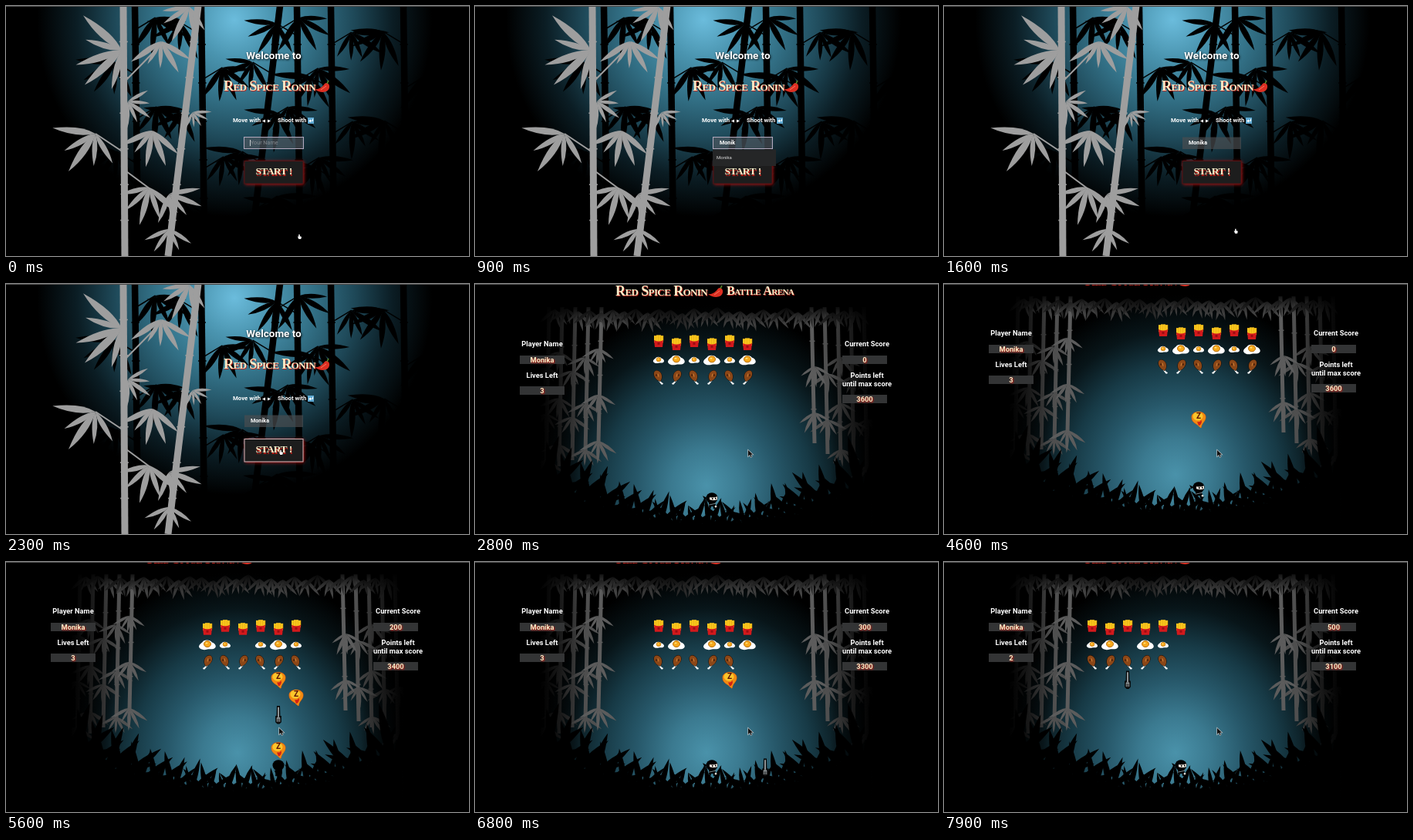
An HTML page with a canvas for the animation above (8 s loop, 600 by 325 pixels).

```html
<!DOCTYPE html>
<html lang="en">
<head>
<meta charset="utf-8">
<title>Red Spice Ronin</title>
<style>
html, body { margin: 0; width: 100%; height: 100%; overflow: hidden; background: #000; }
canvas { display: block; }
</style>
</head>
<body>
<canvas id="stage" width="600" height="325"></canvas>
<script>
const W = 600, H = 325, LOOP = 8000, GAME_START = 2700;
const PLAYER = 'Monika', TITLE = 'Red Spice Ronin';
const SANS = 'Roboto, Arial, sans-serif', SERIF = '"Liberation Serif", serif';
const CREAM = '#f7edc8', RED = '#c4241c';
const stage = document.getElementById('stage').getContext('2d');
let g = stage, seed = 7;

const random = () => (seed = seed * 16807 % 2147483647) / 2147483647;
const clamp = v => Math.max(0, Math.min(1, v));
const ease = v => (v = clamp(v)) * v * (3 - 2 * v);

// ---------- drawing helpers ----------
function layer(draw) {
  const c = document.createElement('canvas');
  c.width = W; c.height = H;
  g = c.getContext('2d');
  draw();
  g = stage;
  return c;
}
function rect(x, y, w, h, fill) { g.fillStyle = fill; g.fillRect(x, y, w, h); }
function ellipse(x, y, rx, ry, fill, stroke) {
  g.beginPath();
  g.ellipse(x, y, rx, ry, 0, 0, 7);
  g.fillStyle = fill; g.fill();
  if (stroke) { g.strokeStyle = stroke; g.lineWidth = 1; g.stroke(); }
}
function line(x1, y1, x2, y2, w, color) {
  g.strokeStyle = color; g.lineWidth = w;
  g.beginPath(); g.moveTo(x1, y1); g.lineTo(x2, y2); g.stroke();
}
function shape(path, fill, stroke, w = 1) {
  const p = new Path2D(path);
  if (stroke) { g.strokeStyle = stroke; g.lineWidth = w; g.stroke(p); }
  g.fillStyle = fill; g.fill(p);
}
function at(x, y, draw, sx = 1, sy = sx) {
  g.save(); g.translate(x, y); g.scale(sx, sy); draw(); g.restore();
}
function shadowed(color, blur, offset, draw) {
  g.save();
  g.shadowColor = color; g.shadowBlur = blur;
  g.shadowOffsetX = g.shadowOffsetY = offset;
  draw();
  g.restore();
}
function text(str, x, y, size, color = '#fff', align = 'center', weight = 'bold') {
  g.font = `${weight} ${size}px ${SANS}`;
  g.textAlign = align; g.textBaseline = 'middle';
  g.fillStyle = color; g.fillText(str, x, y);
}
function fancy(str, x, y, size, align = 'left') {
  g.font = `small-caps bold ${size}px ${SERIF}`;
  g.letterSpacing = '-0.6px';
  g.textAlign = align; g.textBaseline = 'middle';
  g.fillStyle = RED; g.fillText(str, x + .8, y + 1.2);
  g.fillStyle = CREAM; g.fillText(str, x, y);
  g.letterSpacing = '0px';
}
function glow(x, y, rx, ry, colors) {
  at(x, y, () => {
    const grad = g.createRadialGradient(0, 0, 0, 0, 0, 1);
    colors.forEach((c, i) => grad.addColorStop(i / (colors.length - 1), c));
    rect(-1, -1, 2, 2, grad);
  }, rx, ry);
}
function fade(x1, y1, x2, y2) {
  const grad = g.createLinearGradient(x1, y1, x2, y2);
  grad.addColorStop(0, '#000'); grad.addColorStop(1, '#0000');
  rect(0, 0, W, H, grad);
}
const gray = v => `rgb(${v},${v},${v})`;

// ---------- bamboo ----------
function leaf(x, y, angle, len) {
  const w = len * .16;
  g.save();
  g.translate(x, y); g.rotate(angle * Math.PI / 180);
  g.beginPath(); g.moveTo(0, 0);
  g.quadraticCurveTo(len * .45, -w, len, 0);
  g.quadraticCurveTo(len * .35, w, 0, 0);
  g.fill(); g.restore();
}
function tuft(color, x, y, angle, len, n = 5, spread = 120) {
  g.fillStyle = color;
  for (let i = 0; i < n; i++)
    leaf(x, y, angle + spread * (i / (n - 1) - .5) + 8 * random(), len * (.8 + .4 * random()));
}
function stalk(color, x1, y1, x2, y2, w) {
  line(x1, y1, x2, y2, w, color);
  const n = Math.round((y2 - y1) / 48);
  for (let i = 1; i < n; i++) {
    const x = x1 + (x2 - x1) * i / n, y = y1 + (y2 - y1) * i / n;
    line(x - w / 2 - 1, y, x + w / 2 + 1, y, 1.6, color);
  }
}
// A stalk with tufts hanging left and right in turn.
function bamboo(color, x1, x2, w, len, side) {
  stalk(color, x1, 0, x2, 300, w);
  for (let y = 15 + 20 * random(); y < 270; y += 58) {
    const x = x1 + (x2 - x1) * y / 300, tip = x + side * len * .6;
    line(x, y + 16, tip, y, 1.5, color);
    tuft(color, tip, y, 90 - side * 30, len);
    side = -side;
  }
}

const welcomeBack = layer(() => {
  rect(0, 0, W, H, '#000');
  glow(296, 18, 256, 256, ['#6bbcdc', '#4a94af', '#337187', '#1f4a5a', '#0b1d24', '#000']);
  [167, 253, 355, 377, 421, 515].forEach((x, i) =>
    bamboo('#000', x, x + (i == 2 ? -36 : 4), 8.5, 44, i % 2 ? -1 : 1));

  const front = '#9e9e9e';
  stalk(front, 152, 0, 154, H, 9);
  stalk(front, 249, 0, 210, H, 9);
  line(156, 96, 204, 47, 2, front);
  line(152, 190, 116, 166, 2, front);
  line(156, 215, 187, 238, 2, front);
  // x, y, direction, leaf length
  [[150, 58, 160, 58], [116, 166, 120, 52], [158, 124, 30, 35], [190, 162, 95, 44], [186, 236, 100, 48],
   [212, 244, 45, 42], [201, 46, 85, 40], [238, 1, 110, 44], [242, 138, 55, 24], [212, 290, 90, 30]]
    .forEach(p => tuft(front, ...p));
});

const arena = layer(() => {
  rect(0, 0, W, H, '#000');
  glow(300, 262, 225, 235, ['#4a92aa', '#3b7a90', '#27586a', '#173a46', '#081519', '#000']);
  for (const side of [1, -1]) at(side > 0 ? 0 : W, 0, () => {
    for (let i = 0; i < 5; i++) {
      const x = 92 + 17 * i, low = i == 4 ? 207 : 245 - 8 * i, color = gray(40 + 13 * i);
      stalk(color, x + 4, 30, x, low, 5);
      for (let y = 80 + 40 * random(); y < low; y += 60) tuft(color, x, y, 90, 25);
    }
  }, side, 1);
  for (let x = 104; x < 500; x += 15)
    tuft(gray(36 + 36 * random() | 0), x, 30 + 8 * random(), 90, 25, 4, 90);
  fade(84, 0, 140, 0);
  fade(516, 0, 460, 0);
  fade(0, 24, 0, 52);
  for (let x = 84; x <= 520; x += 22) {
    const rise = 55 * ((x - 300) / 200) ** 2, ground = 318 - rise * .7;
    tuft('#000', x, ground, 270, 38 + rise * .6, 6, 150);
    rect(x - 11, ground - 6, 22, 90, '#000');
  }
  fade(0, 323, 0, 300);
});

// ---------- small pictures, each centred on 0,0 ----------
function chili() {
  shape('M-10 3C-4 4 0 0 3-4C6-7 10-3 9 1C8 8-3 9-10 3Z', '#dc2f22');
  line(-2, 4, 5, -1, 1, '#f47a62');
  line(6, -4, 8, -8, 1.6, '#5d8f2e');
}
function fries() {
  for (let x = -4.5; x < 6; x += 3) {
    rect(x - 1.5, -8 + Math.abs(x) / 4, 3, 9, '#f9c51c');
    line(x + 1.5, -7, x + 1.5, 0, .5, '#c88a0a');
  }
  shape('M-6-1Q0 2 6-1L5 8H-5Z', '#d3191c');
  rect(-1.5, 2, 3, 3, '#9c0d12');
}
function egg() {
  shape('M-11 3C-11-1-7-2-5-5C-1-7 4-6 6-3C10-2 12 2 10 4C7 7 3 5 0 6C-4 7-9 7-11 3Z', '#fff');
  ellipse(0, -1, 4.5, 4, '#f7a81b', '#b96e0c');
  ellipse(-1, -2, 1.5, 1, '#ffe07a');
}
function drumstick() {
  line(1, 2, -4, 8, 1.8, '#fff');
  ellipse(-4.3, 8, 1.5, 1.1, '#fff');
  shape('M-2 5C-6 0-4-8 2-9C8-9 7-1 2 3Z', '#8c4717', '#1c0c03');
  line(1, -5, 0, -1, 1.2, '#c67a35');
  ellipse(3, -3, 1, 1.5, '#4f230a');
}
function fork() {
  shape('M-1.2-11H1.2L1.6 2H3V9L1 11H-1L-3 9V2H-1.6Z', '#111', '#000', 1.6);
  line(0, -10, 0, 3, 1.6, '#aeb6b9');
  line(-2, 4, 2, 4, 1.2, '#aeb6b9');
  for (let x = -1.8; x < 2; x += 1.8) line(x, 4, x, 9, .8, '#aeb6b9');
}
function fireball() {
  shape('M-9-3C-9-12 9-12 9-3C9 3 4 4 3 11C0 9-1 7-3 6C-7 4-9 1-9-3Z', '#f28a12', '#d8570a');
  ellipse(-1, -4, 6.5, 5.5, '#fbc62b');
  text('Z', 0, -4, 10, '#5a1208');
  shape('M-2 3Q3 4 3 0L4 3Q3 8 0 8Z', '#d21f16');
}
function ninja(turned) {
  shape('M-4 1H4L5 8H-4Z', '#000');
  line(-2, 7, -3, 11, 2.4, '#000');
  line(3, 7, 3, 11, 2.4, '#000');
  ellipse(0, -3, 7.5, 7, '#000');
  if (turned) return;
  shape('M-6-3L-12-6L-10-2L-12 0Z', '#000');
  shape('M-3-4Q3-3 7-5L7-1Q2 1-3-1Z', '#f4ece2');
  rect(0, -3, 1.5, 2, '#000'); rect(4, -3.5, 1.5, 2, '#000');
  line(-4, 6, 5, 4, 1, '#77858a');
  ellipse(5, 8, 1.3, 1.3, '#e8e0d6');
}
function hand() {
  shape('M-1-4V0L-3-1L-1 4H3L4 0L1-1V-4Z', '#fff', '#000', 1.2);
}
function arrow() {
  shape('M-2-4V4L0 2L1.5 5L2.7 4.4L1.4 1.7H4Z', '#111', '#ccc', 1.2);
}

// ---------- welcome page ----------
function welcome(t) {
  g.drawImage(welcomeBack, 0, 0);
  shadowed('#000', 3, 1, () => text('Welcome to', 347, 65, 13.5));
  fancy(TITLE, 282, 105, 18);
  at(410, 105, chili);
  text('Move with', 294, 149, 7.8, '#fff', 'left');
  shape('M332 149.5l4-2v4zM343 149.5l-4-2v4z', '#fff');
  text('Shoot with', 352, 149, 7.8, '#fff', 'left');
  rect(391, 145, 8, 8, '#5fa9d2');
  shape('M392 149.5l3-2v1.3h2v-2h1v3h-3v1.4z', '#fff');

  const focused = t < 1500, hover = t > 1950;
  const typed = PLAYER.slice(0, Math.max(0, Math.floor((t - 110) / 140)));
  rect(309, 170.5, 76, 15.5, focused ? '#4d5760b0' : '#4a4e50b0');
  g.lineWidth = 1;
  if (focused) {
    g.strokeStyle = '#b3a9bd';
    g.strokeRect(308.5, 170.5, 77, 15);
  }
  text(typed || 'Your Name', 317, 178, 7.2, typed ? '#fff' : '#858b90', 'left', typed ? 'bold' : 'normal');
  if (focused && t % 1000 < 500) {
    const x = 317 + (typed ? g.measureText(typed).width : -.5);
    line(x, 174, x, 182, .7, '#fff');
  }

  shadowed('#c01818', 4, 1, () => rect(309, 201, 76, 30, '#1d1d1d'));
  g.strokeStyle = hover ? '#d9b9bc' : '#541315'; g.lineWidth = 1;
  g.strokeRect(309, 201.5, 76, 29.5);
  fancy('START !', 347, 216, 13.5, 'center');
  if (typed && t < 1300) {
    rect(308, 186.5, 82, 21.5, '#252627');
    text(PLAYER, 313, 197, 6, '#dcdcdc', 'left', 'normal');
  }

  const k = ease((t - 1500) / 550);
  if (t < 200 || t > 1450) at(380 - 24 * k, 300 - 81 * k, hand, .75);
}

// ---------- game ----------
const cellX = c => 192 + 23 * c, cellY = r => 76 + 22.8 * r;
// Shots rise from row 8, forks fall from row 4; each ends after its last row.
const flight = (first, pace) => ([start, col, last, hit]) =>
  ({ start, col, last, hit, end: start + pace * Math.abs(last - first),
     row: t => first + Math.sign(last - first) * Math.floor((t - start) / pace) });
const shots = [[4100, 6, 2, 2], [4990, 7, 3], [5140, 8, 3, 5], [5560, 7, 7], [6190, 6, 2, 5]].map(flight(8, 150));
const forks = [[3460, 2, 10], [5350, 7, 7], [6250, 8, 10], [6860, 5, 10], [7850, 2, 10]].map(flight(4, 100));
const HOME = 5;

function field(label, value, x, y, boxX, gap = 21) {
  label.split('\n').forEach((s, i) => text(s, x, y + 11 * i, 9.3));
  rect(boxX, y + gap - 6, 58, 11, '#333435');
  shadowed('#d01c10', 2, 1, () => text(value, boxX + 29, y + gap, 9.3, CREAM));
}

function game(t) {
  rect(0, 0, W, H, '#000');
  g.save();
  g.translate(0, -Math.round(14 * ease((t - 3900) / 400)));
  g.drawImage(arena, 0, 0);
  fancy(TITLE, 182, 10, 18);
  at(312, 10, chili);
  fancy('Battle Arena', 326, 10, 16.3);

  const killed = shots.filter(s => s.hit && s.end <= t);
  const score = killed.reduce((sum, s) => sum + (s.last == 2 ? 200 : 100), 0);
  const lives = 3 - forks.filter(f => f.col == HOME && f.end <= t).length;
  field('Player Name', PLAYER, 87, 78, 58);
  field('Lives Left', lives, 87, 119, 58, 20);
  field('Current Score', score, 508, 78, 476);
  field('Points left\nuntil max score', 3600 - score, 508, 119, 476, 31);

  // The pack walks right to the edge, drops a row, then walks left.
  const step = Math.floor((t - GAME_START) / 700);
  const left = step < 3 ? 2 + step : 7 - step, top = step < 3 ? 0 : 1;
  for (let row = 0; row < 3; row++) for (let i = 0; i < 6; i++) {
    if (killed.some(s => s.last - 1 == row && s.hit == i)) continue;
    const col = left + i, odd = col % 2, x = cellX(col), y = cellY(top + row);
    if (row == 0) at(x, y + (odd ? 2 : -2), fries);
    if (row == 1) at(x, y, egg, odd ? 1 : .65);
    if (row == 2) at(x, y, drumstick, odd ? 1 : -1, 1);
  }
  const fly = (list, draw) => list.filter(s => t >= s.start && t < s.end)
    .forEach(s => at(cellX(s.col), cellY(s.row(t)), draw));
  fly(shots, fireball);
  fly(forks, fork);

  // The player steps out to shoot and returns home afterwards.
  const shot = shots.filter(s => t >= s.start - 100 && t < s.start + 600).pop();
  const shooting = shot && t >= shot.start && t < shot.start + 200;
  at(cellX(shot ? shot.col : HOME), cellY(9), () => ninja(shooting));
  g.restore();
  at(356, 220, arrow);
}

function frame(now) {
  const t = now % LOOP;
  (t < GAME_START ? welcome : game)(t);
  rect(0, 0, W, 1, '#4a4a4a');
  requestAnimationFrame(frame);
}
requestAnimationFrame(frame);
</script>
</body>
</html>
```
